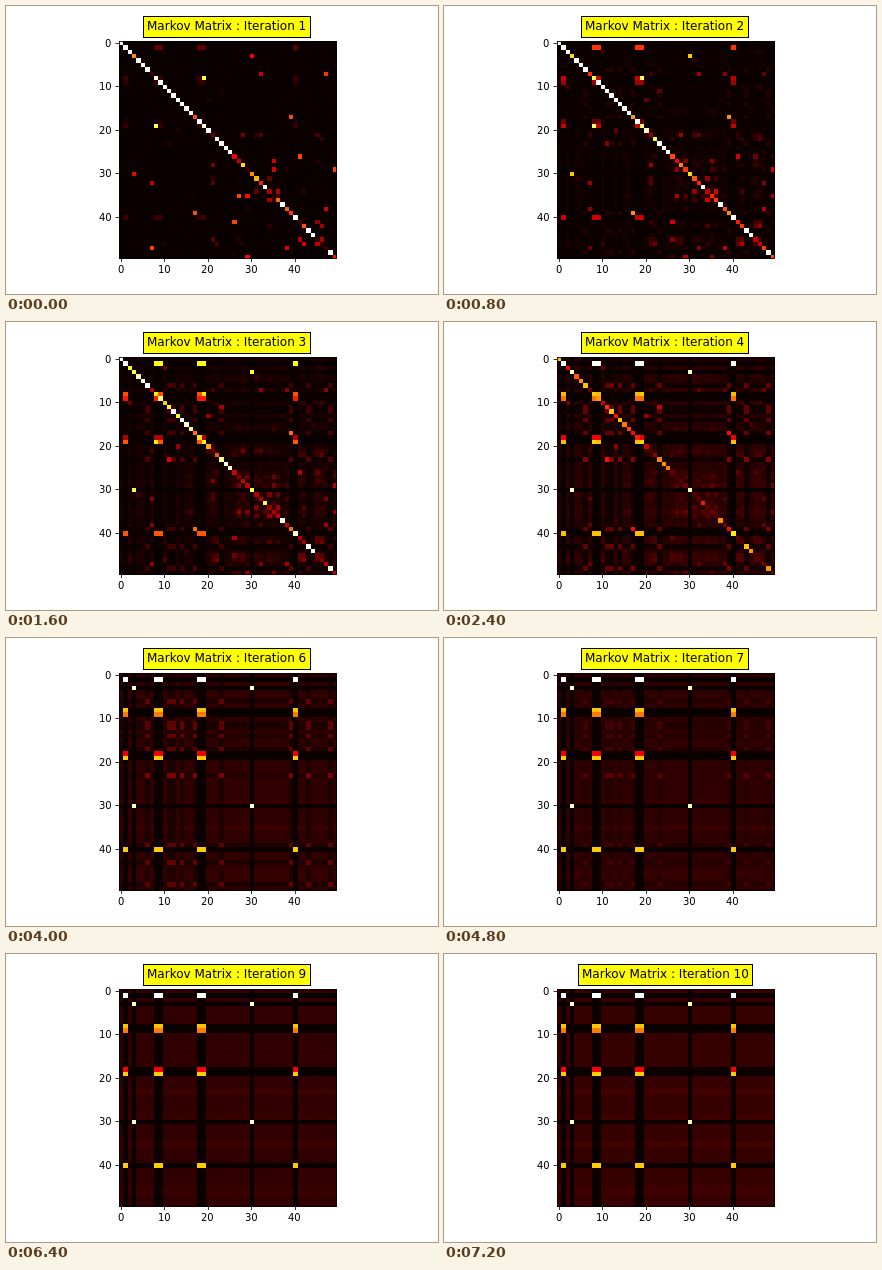
Write an HTML page with a canvas that moves like this. It is 432 px wide and 288 px high and loops after 8 s.

```html
<!DOCTYPE html>
<html lang="en">
<head>
<meta charset="utf-8">
<title>Markov matrix</title>
<style>
  html, body { margin: 0; width: 100%; height: 100%; overflow: hidden; background: #fff; }
  canvas, svg { position: absolute; left: 0; top: 0; width: 432px; height: 288px; }
  text { font: 10px "DejaVu Sans", sans-serif; }
  #title { font-size: 12px; }
  .axis { fill: none; stroke: #000; stroke-width: .8; }
</style>
</head>
<body>
<canvas id="heat" width="432" height="288"></canvas>
<svg id="chart" viewBox="0 0 432 288">
  <rect x="113.5" y="35.5" width="217" height="217" class="axis"/>
  <rect id="box" y="10.5" height="21" fill="#ff0" stroke="#000"/>
  <text id="title" y="24"></text>
</svg>
<script>
const SIZE = 50, STEPS = 10, STEP_MS = 800;
const LEFT = 113, TOP = 35, CELL = 218 / SIZE;
const chart = document.getElementById('chart');
const title = document.getElementById('title');
const box = document.getElementById('box');
const ctx = document.getElementById('heat').getContext('2d');

// Two closed classes, a community that leaks slowly, and a few strong links.
const hub = { 1: 1, 8: .66, 9: .55, 18: .36, 19: .67, 40: .67 };
const hubSum = Object.values(hub).reduce((a, b) => a + b);
const pair = [3, 30];
const slow = [6, 11, 12, 14, 17, 23, 39, 43, 48];
const links = [pair, [8, 19], [7, 47], [17, 39], [26, 41], [27, 35], [29, 35], [29, 49]];

const kindOf = i => i in hub ? 'hub' : pair.includes(i) ? 'pair' : slow.includes(i) ? 'slow' : 'free';
const kinds = Array.from({ length: SIZE }, (_, i) => kindOf(i));
const weight = i => hub[i] || (i === 23 ? 1.35 : 1);
const finalGain = { hub: hubSum, pair: 1.86, slow: 2.2, free: 2.2 };

function seeded(seed) {
  return () => {
    seed = (seed + 0x6D2B79F5) | 0;
    let t = Math.imul(seed ^ seed >>> 15, 1 | seed);
    t = t + Math.imul(t ^ t >>> 7, 61 | t) ^ t;
    return ((t ^ t >>> 14) >>> 0) / 4294967296;
  };
}

const grid = () => Array.from({ length: SIZE }, () => new Float64Array(SIZE));

function transitions() {
  const random = seeded(17), m = grid();
  const join = (i, j, w) => {
    m[i][j] += w * weight(i);
    m[j][i] += w * weight(j);
  };
  // Most random links are negligible, a few are strong.
  const rate = (a, b) => {
    if (a === 'hub' && b === 'hub') return .4 / hubSum;
    if ([a, b].some(kind => kind === 'hub' || kind === 'pair')) return 0;
    if (a !== b) return .0006;
    return .14 / kinds.filter(kind => kind === a).length + .33 * random() ** 50;
  };
  for (let i = 0; i < SIZE; i++)
    for (let j = i + 1; j < SIZE; j++) join(i, j, rate(kinds[i], kinds[j]));
  for (const [i, j] of links) join(i, j, .42);

  for (let j = 0; j < SIZE; j++) {
    const sum = m.reduce((total, row) => total + row[j], 0);
    m[j][j] = Math.max(.12, 1 - sum);
    for (const row of m) row[j] /= sum + m[j][j];
  }
  return m;
}

function square(m) {
  const out = grid();
  for (let i = 0; i < SIZE; i++) for (let k = 0; k < SIZE; k++) {
    const v = m[i][k];
    if (v) for (let j = 0; j < SIZE; j++) out[i][j] += v * m[k][j];
  }
  return out;
}

const matrices = [transitions()];
while (matrices.length < STEPS) matrices.push(square(matrices[matrices.length - 1]));

function hot(x) {
  const channel = v => Math.round(255 * Math.min(1, Math.max(0, v)));
  return `rgb(${channel(.0416 + x * 2.625)},${channel((x - .365) / .381)},${channel((x - .746) / .254)})`;
}

function draw(step) {
  const ramp = .64 + .12 * Math.min(3, step);
  const gamma = 1 + .5 / (1 + step) ** 2;
  const edge = (start, n) => Math.round(start + n * CELL);
  for (let i = 0; i < SIZE; i++) for (let j = 0; j < SIZE; j++) {
    const x = edge(LEFT, j), y = edge(TOP, i);
    ctx.fillStyle = hot((matrices[step][i][j] * finalGain[kinds[i]] * ramp) ** gamma);
    ctx.fillRect(x, y, edge(LEFT, j + 1) - x, edge(TOP, i + 1) - y);
  }
  title.textContent = `Markov Matrix : Iteration ${step + 1}`;
  const width = title.getComputedTextLength(), x = Math.round(221 - width / 2);
  title.setAttribute('x', x);
  box.setAttribute('x', x - 3.5);
  box.setAttribute('width', Math.round(width + 7.5));
}

function add(tag, attributes, text = '') {
  const node = document.createElementNS(chart.namespaceURI, tag);
  for (const key in attributes) node.setAttribute(key, attributes[key]);
  node.textContent = text;
  chart.append(node);
  return node;
}

function label(n, x, y, shift) {
  const node = add('text', { y: Math.round(y) }, n);
  node.setAttribute('x', Math.round(x - node.getComputedTextLength() * shift));
}

for (let n = 0; n < SIZE; n += 10) {
  const offset = (n + .5) * 4.349, x = 112.68 + offset, y = 34.56 + offset;
  add('path', { class: 'axis', d: `M${Math.round(x) + .5} 252.5v3.5M113.5 ${Math.round(y) + .5}h-4` });
  label(n, x, 267, .5);
  label(n, 105.7, y + 4, 1);
}

const start = performance.now();
let shown = -1;
function tick() {
  const step = Math.floor((performance.now() - start) / STEP_MS) % STEPS;
  if (step !== shown) draw(shown = step);
  requestAnimationFrame(tick);
}
tick();
</script>
</body>
</html>
```
